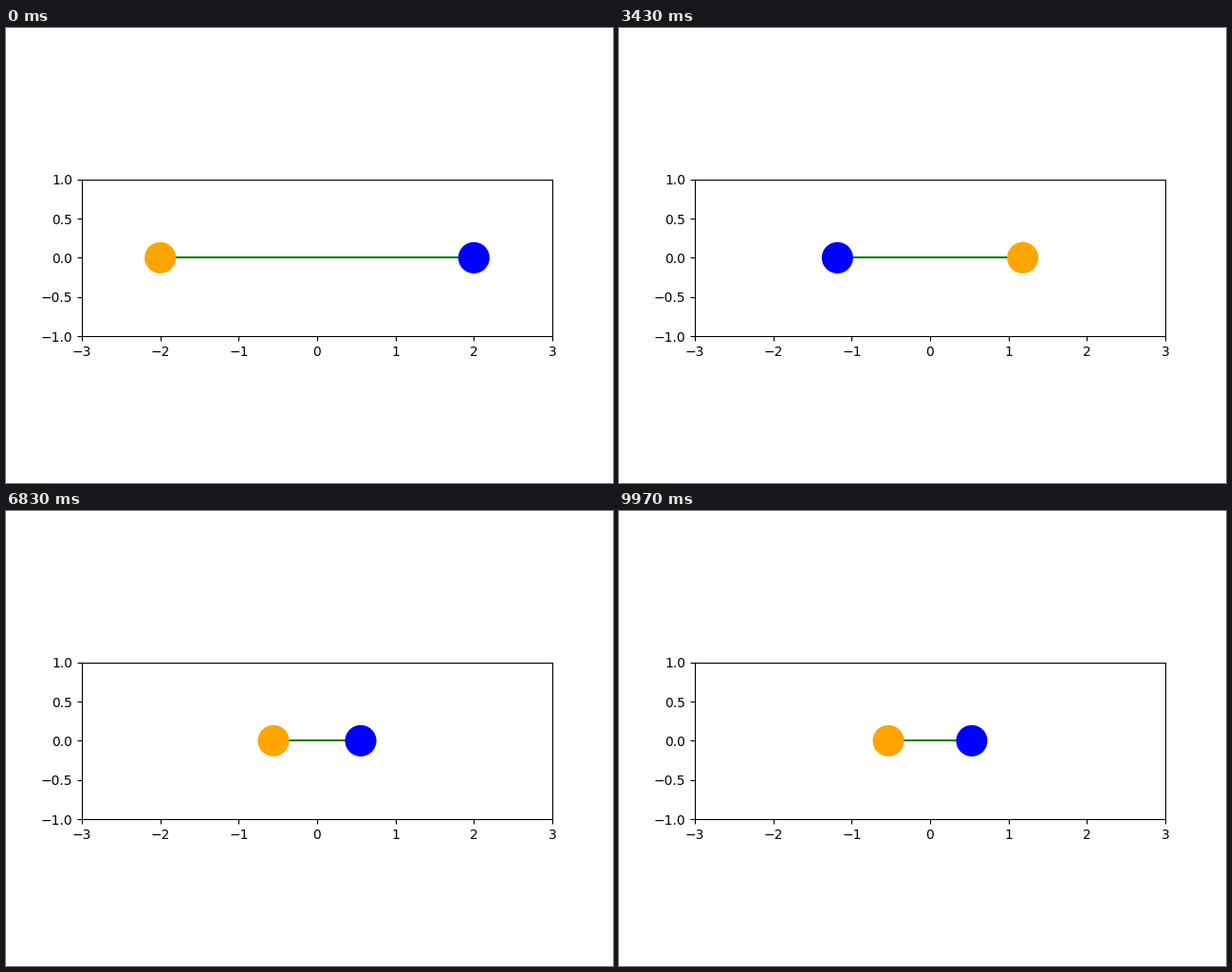
Recreate the animation shown at these times as a matplotlib script. Size 640 px wide and 480 px high, loop 10 s.

```python
import numpy as np
import matplotlib.pyplot as plt
from matplotlib.animation import FuncAnimation

FRAMES = 300
LOOP_MS = 10000

# Two equal masses on a damped spring, released from rest
STIFFNESS = 40.0
DAMPING = 0.25
START = 2.0
RADIUS = 0.2

times = np.linspace(0, 10, FRAMES)
decay = DAMPING / 2
omega = np.sqrt(STIFFNESS - decay**2)
offsets = START * np.exp(-decay * times) * (
    np.cos(omega * times) + decay / omega * np.sin(omega * times))

fig, ax = plt.subplots(figsize=(6.4, 4.8), dpi=100)
ax.set_xlim(-3, 3)
ax.set_ylim(-1, 1)
ax.set_aspect("equal")

spring, = ax.plot([], [], color="green", lw=1.5, zorder=2)


def add_ball(color, zorder):
    ball = plt.Circle((0, 0), RADIUS, facecolor=color, edgecolor="none",
                      linewidth=0, zorder=zorder)
    return ax.add_patch(ball)


left = add_ball("orange", 3)
right = add_ball("blue", 4)


def update(i):
    x = offsets[i]
    left.center = (-x, 0)
    right.center = (x, 0)
    spring.set_data([-x, x], [0, 0])
    return spring, left, right


anim = FuncAnimation(fig, update, frames=FRAMES, interval=LOOP_MS / FRAMES,
                     init_func=lambda: update(0), repeat=True, repeat_delay=0)

plt.show()
```
